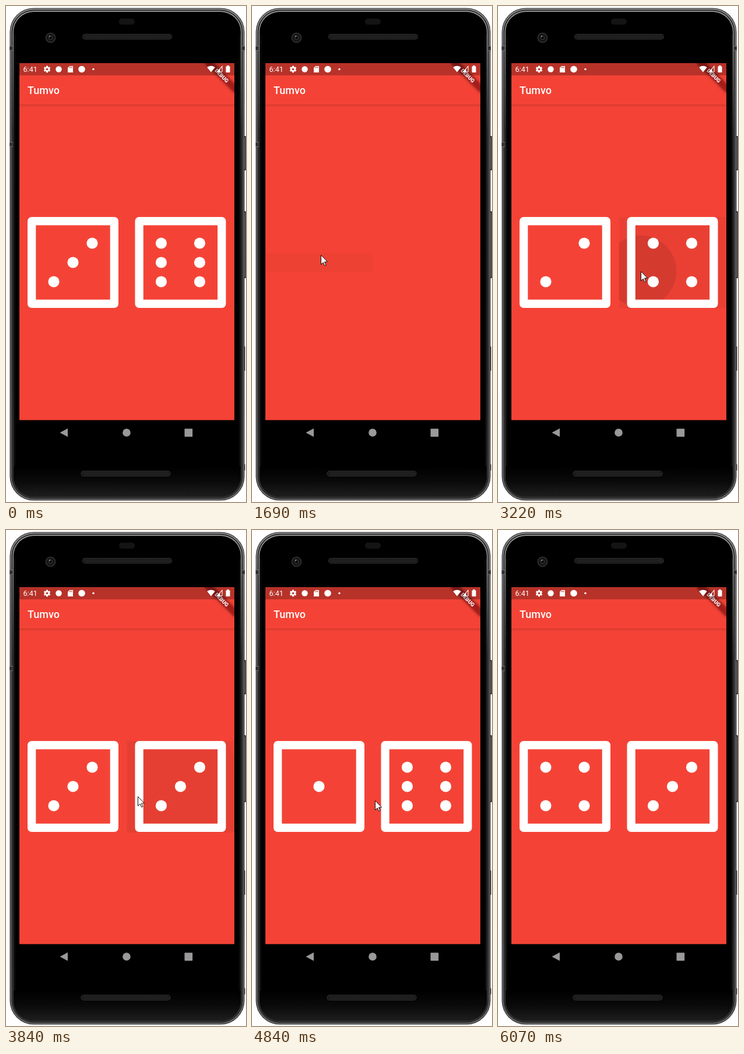
Write an HTML page with a canvas that moves like this. It is 412x851 px and loops after 6770 ms.

```html
<!DOCTYPE html>
<html lang="en">
<head>
<meta charset="utf-8">
<title>Dice roller</title>
<style>
  html, body { margin: 0; width: 100%; height: 100%; overflow: hidden; background: #fff; }
  canvas { display: block; width: 412px; height: 851px; }
</style>
</head>
<body>
<canvas id="stage"></canvas>
<script>
const W = 412, H = 851, LOOP = 6770, START = 140, STEP = 77, EXIT = 6065;
const GLIDE = 400, FADE = 200, LOAD = 320;
const MID = 440, LEFT = 115, GAP = 184.5;
const canvas = document.getElementById('stage');
const dpr = window.devicePixelRatio || 1;

// resting points of the pointer: arrival time, x, y
const stops = [[START, 278, 786], [600, 163, 457], [1210, 118, 427], [2840, 245, 455],
  [4110, 164, 465], [5050, 268, 462], [5760, 359, 766], [EXIT, 374, H]];

const tap = (down, up, stop, dice) => ({ down, up, x: stops[stop][1], y: stops[stop][2], dice });
const taps = [
  tap(1450, 1500, 2, [4, 1]),
  tap(2230, 2360, 2, [5, 4]),
  tap(3075, 3170, 3, [2, 4]),
  tap(3560, 3680, 3, [3, 3]),
  tap(4120, 4450, 4, [1, 6]),
  tap(5060, 5230, 5, [4, 3]),
];

function makeLayer(el) {
  el.width = W * dpr;
  el.height = H * dpr;
  const c = el.getContext('2d');
  c.scale(dpr, dpr);
  return c;
}

const ctx = makeLayer(canvas);
const phone = document.createElement('canvas');
drawPhone(makeLayer(phone));

function box(c, x, y, w, h, r, fill) {
  c.beginPath();
  c.roundRect(x, y, w, h, r);
  c.fillStyle = fill;
  c.fill();
}

function disc(c, x, y, r, fill) {
  c.beginPath();
  c.arc(x, y, r, 0, Math.PI * 2);
  c.fillStyle = fill;
  c.fill();
}

function poly(c, pts, fill) {
  c.beginPath();
  pts.forEach(([x, y]) => c.lineTo(x, y));
  c.closePath();
  c.fillStyle = fill;
  c.fill();
}

function ramp(c, x0, y0, x1, y1, ...stops) {
  const g = c.createLinearGradient(x0, y0, x1, y1);
  stops.forEach((s, i) => g.addColorStop(i / (stops.length - 1), s));
  return g;
}

function drawSpeaker(c, x, y) {
  box(c, x, y, 154, 9.5, 4.7, '#343434');
  box(c, x + 1, y + 1, 152, 7.5, 3.7, '#171717');
  for (let i = 0; i < 98; i++) {
    box(c, x + 4 + i * 1.5, y + 2.7 + i % 2 * 2.4, 1.3, 1.3, 0, '#3b3b3b');
  }
}

function drawBody(c) {
  c.fillStyle = '#fff';
  c.fillRect(0, 0, W, H);
  [[223, 59], [352, 115]].forEach(([y, h]) => {
    box(c, 406, y, 6, h, 1.5, '#333');
    box(c, 408.5, y + 2, 2, h - 4, 1, '#858585');
  });
  box(c, 407, 584, 3.5, 42, 1, '#333');
  box(c, 407, 786, 3.5, 11, 1, '#444');

  // nested shells from the outer edge to the glass
  const shell = (inset, fill) =>
    box(c, 6.5 + inset, 3.5 + inset, 403 - inset * 2, 845 - inset * 2, 41 - inset, fill);
  shell(0, '#2b2b2b');
  shell(1, ramp(c, 0, 4, 0, 848, '#8a8a8a', '#5c5c5c', '#5c5c5c', '#5c5c5c', '#6a6a6a'));
  shell(3, '#2a2a2a');
  shell(5, ramp(c, 0, 8, 0, 843, '#aaa', '#2c2c2c', '#242424', '#242424', '#333'));
  shell(6.5, '#000');
  const rim = 'rgba(40,40,40,.6)', clear = 'rgba(0,0,0,0)';
  box(c, 13, 50, 6, 750, 0, ramp(c, 13, 0, 19, 0, rim, clear));
  box(c, 397, 50, 6, 750, 0, ramp(c, 397, 0, 403, 0, clear, rim));
  box(c, 13, 790, 390, 52, [0, 0, 34, 34], ramp(c, 0, 790, 0, 842, '#000', '#0a0a0a', '#1e1e1e'));

  [[6.5, 68], [6.5, 233], [405, 68]].forEach(([x, y]) => {
    box(c, x, y, 5, 9, 0, '#686868');
    box(c, x, y + 1.5, 5, 6, 0, '#303030');
  });

  box(c, 194, 21.5, 27, 10.5, 5, '#141414');
  drawSpeaker(c, 131, 48);
  drawSpeaker(c, 128.5, 797.5);
  ['#2b2b2b', '#111', '#29292b', '#050505'].forEach((fill, i) =>
    disc(c, 76.5, 54.5, 9 - i * 2.3, fill));
  disc(c, 75, 52, 1.2, '#888');
}

function drawBanner(c) {
  c.save();
  c.beginPath();
  c.rect(23, 98, 369, 612.5);
  c.clip();
  c.translate(392, 98);
  c.rotate(Math.PI / 4);
  c.filter = `blur(${2.7 * dpr}px)`;
  box(c, -36, 25.1, 72, 10.8, 0, 'rgba(0,0,0,.5)');
  c.filter = 'none';
  box(c, -36, 25.1, 72, 10.8, 0, 'rgba(183,28,28,.63)');
  c.font = '900 9.2px Roboto, sans-serif';
  c.textAlign = 'center';
  c.fillStyle = '#fff';
  c.fillText('DEBUG', 0, 33.8);
  c.restore();
}

function drawStatus(c) {
  const tint = '#b73228';
  c.fillStyle = '#fff';
  c.font = '12.6px Roboto, sans-serif';
  c.fillText('6:41', 29.5, 113.2);

  c.save();
  c.translate(70.5, 108.5);
  for (let i = 0; i < 6; i++) {
    c.rotate(Math.PI / 3);
    c.fillRect(-1.5, -5.8, 3, 4);
  }
  disc(c, 0, 0, 4.3, '#fff');
  disc(c, 0, 0, 1.8, tint);
  c.restore();

  disc(c, 90.5, 108.5, 5.2, '#fff');
  poly(c, [[109, 103], [115, 103], [115, 114], [106, 114], [106, 106]], '#fff');
  for (let x = 108.5; x < 113; x += 2) box(c, x, 104.2, 1, 2.2, 0, tint);
  disc(c, 130, 108.5, 5.8, '#fff');
  disc(c, 150, 108.5, 1.7, '#fff');

  c.beginPath();
  c.moveTo(352, 113.5);
  c.lineTo(345.2, 105.2);
  c.quadraticCurveTo(352, 100.5, 358.8, 105.2);
  c.fillStyle = c.strokeStyle = '#fff';
  c.fill();
  poly(c, [[371, 103.5], [371, 113], [362.5, 113]], 'transparent');
  c.lineWidth = 1.1;
  c.stroke();
  poly(c, [[367.5, 107.5], [367.5, 113], [362.5, 113]], '#fff');
  box(c, 377.5, 103.5, 7, 10.5, 0.8, '#fff');
  box(c, 379.3, 102, 3.4, 2, 0, '#fff');
}

function drawPhone(c) {
  drawBody(c);
  box(c, 23, 98, 369, 612.5, 0, '#f44336');
  box(c, 23, 169, 369, 5, 0, ramp(c, 0, 169, 0, 174, 'rgba(0,0,0,.15)', 'rgba(0,0,0,.05)', 'rgba(0,0,0,0)'));
  drawBanner(c);
  box(c, 23, 98, 369, 21, 0, 'rgba(0,0,0,.25)');
  drawStatus(c);
  c.fillStyle = '#fff';
  c.font = '500 18px Roboto, sans-serif';
  c.fillText('Tumvo', 37, 151);

  const nav = '#999';
  poly(c, [[92.5, 732], [106, 724.7], [106, 739.3]], nav);
  disc(c, 207, 732, 6.8, nav);
  box(c, 306.5, 725.2, 13.7, 13.7, 1, nav);
}

function drawDie(n, x) {
  ctx.beginPath();
  ctx.roundRect(x - 78, MID - 78, 156, 156, 7);
  ctx.rect(x - 63.7, MID - 63.7, 127.4, 127.4);
  ctx.fillStyle = '#fff';
  ctx.fill('evenodd');
  const pip = (i, j) => disc(ctx, x + i * 33, MID + j * 33, 9.6, '#fff');
  const pair = (i, j) => { pip(i, j); pip(-i, -j); };
  if (n % 2) pip(0, 0);
  if (n > 1) pair(1, -1);
  if (n > 3) pair(1, 1);
  if (n === 6) pair(1, 0);
}

// ink ripple: slow growth while held, fast growth and fade after release
function drawInk({ down, up, x, y }, t, height) {
  const after = Math.max(0, t - up);
  if (t < down || after > FADE) return;
  const left = x < 207 ? 23 : 23 + GAP, top = MID + 0.5 - height / 2;
  const reach = Math.hypot(Math.max(x - left, left + GAP - x), y - top);
  const held = (Math.min(t, up) - down) / 1000 * reach;
  const glow = after ? 0.08 * (1 - Math.abs(after / 100 - 1)) : 0.015;
  ctx.save();
  ctx.beginPath();
  ctx.rect(left, top, GAP, height);
  ctx.clip();
  box(ctx, left, top, GAP, height, 0, `rgba(0,0,0,${glow})`);
  disc(ctx, x, y, Math.min(reach, held + after * 0.9), `rgba(0,0,0,${0.12 * (1 - after / FADE)})`);
  ctx.restore();
}

function pointerAt(t) {
  const i = stops.findIndex(s => s[0] > t);
  const [t0, x0, y0] = stops[i - 1], [t1, x1, y1] = stops[i];
  const span = Math.min(GLIDE, t1 - t0);
  const u = Math.max(0, 1 - (t1 - t) / span), e = u * u * (3 - 2 * u);
  return [x0 + (x1 - x0) * e, y0 + (y1 - y0) * e];
}

function drawPointer(t) {
  if (t < START || t >= EXIT) return;
  const [x, y] = pointerAt(t);
  ctx.save();
  ctx.translate(Math.round(x) + 0.5, Math.round(y) + 0.5);
  poly(ctx, [[0, 0], [0, 16], [3.7, 12.5], [6.2, 18], [8.5, 17], [6, 11.6], [11, 11.2]], '#fff');
  ctx.lineWidth = 1;
  ctx.lineJoin = 'round';
  ctx.strokeStyle = '#111';
  ctx.stroke();
  ctx.restore();
}

function draw(now) {
  const ms = now % LOOP;
  const t = ms < START ? 0 : START + Math.floor((ms - START + 5) / STEP) * STEP;
  const last = taps.filter(p => p.up <= t).pop();
  const [a, b] = last ? last.dice : [3, 6];
  const loading = last === taps[0] && t < last.up + LOAD;
  const held = taps.find(p => t >= p.down && t < p.up);

  ctx.drawImage(phone, 0, 0, W, H);
  taps.forEach(p => drawInk(p, t, loading ? 33 : 157.5));
  if (!loading) {
    drawDie(a, LEFT);
    drawDie(b, LEFT + GAP);
  }
  if (held) disc(ctx, held.x - 1, held.y - 1, 12.3, '#eb9717');
  drawPointer(t);
}

const begin = performance.now();
function tick() {
  draw(performance.now() - begin);
  requestAnimationFrame(tick);
}
tick();
</script>
</body>
</html>
```
